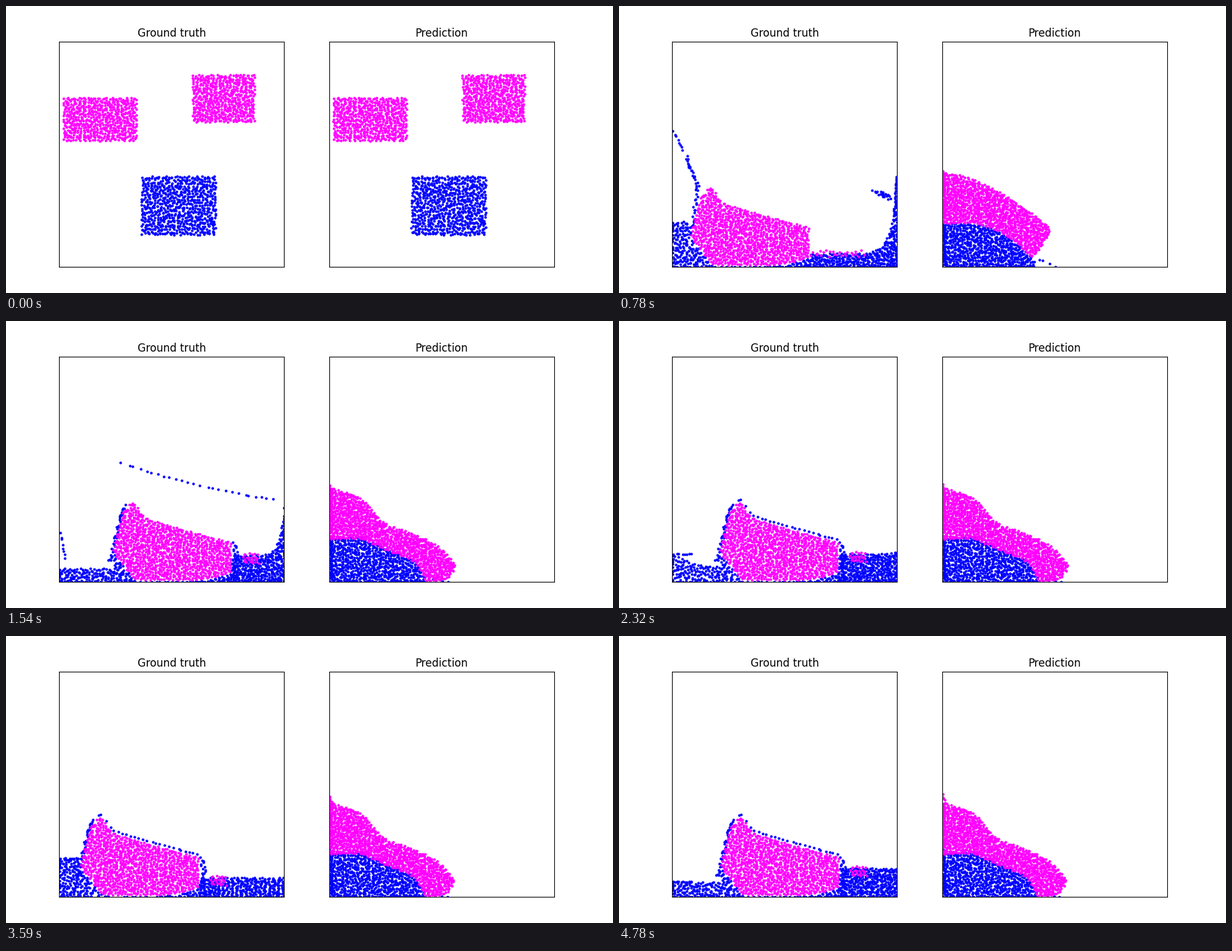
A matplotlib script for the animation above (4.82 s loop, 950 by 450 pixels).

```python
import numpy as np
import matplotlib.pyplot as plt
from matplotlib.animation import FuncAnimation

W, H, DPI = 950, 450, 100
FRAMES, INTERVAL, STEPS = 241, 20, 134
SIDE, LEFT, BASE, GAP = 352.27, 83.0, 41.37, 422.73
FLOOR, GRAVITY = 410, 0.7

GOOP_A, GOOP_B, CHUNK = 575, 515, 25
SPRAY, POOL_L, FLANK, POOL_R, RIM, ROOF = 8, 195, 42, 440, 24, 26
WATER_PARTS = [SPRAY, POOL_L, FLANK, POOL_R, RIM, ROOF]
WATER = sum(WATER_PARTS)
CLING, DRIPS = 32, 5
GOOP_MIX, WATER_MIX = 0.34, 0.55


# ---- spreading particles ----

def fill(n, x0, x1, top, bottom=FLOOR, sizes=None, mix=GOOP_MIX):
    """Spread n particles evenly between two curves, in a stable order."""
    rng = np.random.default_rng(5)
    gx = np.linspace(x0, x1, 500)
    y0, y1 = (f(gx) if callable(f) else np.full(500, float(f)) for f in (top, bottom))
    height = np.maximum(y1 - y0, 0.5)
    cdf = np.concatenate([[0], np.cumsum((height[1:] + height[:-1]) / 2)])
    area = cdf[-1] * (x1 - x0) / 499
    cols = max(1, round((x1 - x0) / np.sqrt(area / n)))
    edges = np.linspace(x0, x1, cols + 1)
    marks = np.round(n * np.interp(edges, gx, cdf / cdf[-1])).astype(int)
    counts = np.diff(marks)

    col = np.repeat(np.arange(cols), counts)
    row = np.arange(n) - marks[col]
    v = (row + 0.3 + 0.4 * (col % 2) + rng.uniform(-mix, mix, n)) / counts[col]
    x = edges[col] + (x1 - x0) / cols * (0.5 + rng.uniform(-0.45, 0.45, n))
    tops = np.interp(x, gx, y0)
    pts = np.column_stack([x, tops + np.clip(v, 0, 1) * np.interp(x, gx, height)])

    # Match poses by narrow strips from left to right, top to bottom inside each.
    order = []
    for part in np.split(np.argsort(x), np.cumsum(sizes or [n])[:-1]):
        k = len(part)
        strip = np.arange(k) * max(1, round(np.sqrt(k))) // k
        order.append(part[np.lexsort((v[part], strip))])
    return pts[np.concatenate(order)]


def strand(n, *path, jitter=1.0):
    """Scatter n particles along a polyline."""
    rng = np.random.default_rng(8)
    path = np.array(path, float)
    u = (np.arange(n) + 0.5 + rng.uniform(-0.4, 0.4, n)) / n * (len(path) - 1)
    pts = [np.interp(u, np.arange(len(path)), c) for c in path.T]
    return np.column_stack(pts) + rng.uniform(-jitter, jitter, (n, 2))


def curve(n, x0, x1, f):
    pts = strand(n, (x0, 0), (x1, 0), jitter=0.8)
    return pts + np.column_stack([np.zeros(n), f(pts[:, 0])])


class Body:
    """Particles that glide through timed poses without overshoot."""

    def __init__(self, poses):
        self.t = np.array(sorted(poses), float)
        self.p = np.array([poses[k] for k in sorted(poses)])
        slope = np.diff(self.p, axis=0) / np.diff(self.t)[:, None, None]
        a, b = slope[:-1], slope[1:]
        same = a * b > 0
        mid = np.where(same, 2 * a * b / np.where(same, a + b, 1), 0)
        self.m = np.concatenate([slope[:1], mid, slope[-1:]])

    def at(self, t):
        i = min(np.searchsorted(self.t, t, side="right") - 1, len(self.t) - 2)
        h = self.t[i + 1] - self.t[i]
        s = (t - self.t[i]) / h
        r = 1 - s
        return ((1 + 2 * s) * r**2 * self.p[i] + s * r**2 * h * self.m[i]
                + s**2 * (3 - 2 * s) * self.p[i + 1] - s**2 * r * h * self.m[i + 1])


# ---- falling blocks, shared by both panels ----

def fall(block, vx, vy, t):
    return block + (vx * t, vy * t + GRAVITY * t**2 / 2)


def falling_goop(a_sizes, b_sizes, dx=0):
    a = fill(GOOP_A, 89 + dx, 204 + dx, 143, 211, a_sizes)
    b = fill(GOOP_B + CHUNK, 291 + dx, 389 + dx, 107, 182, b_sizes)
    return {t: np.vstack([fall(a, -0.25, 6, t), fall(b, -8.75, 3.5, t)])
            for t in (0, 4, 8, 12)}


def falling_water(sizes, mound, dx=0):
    block = fill(WATER, 211 + dx, 328 + dx, 266, 359, sizes, WATER_MIX)
    poses = {t: fall(block, -3, 3.5, t) for t in (0, 4, 8)}
    x0, x1 = mound
    poses[12] = fill(WATER, x0, x1,
                     lambda x: 404 - 72 * np.sin(np.pi * (x - x0) / (x1 - x0)) ** 0.7,
                     sizes=sizes, mix=WATER_MIX)
    return poses


# ---- left panel: a rigid lump sloshing between two pools ----

def drift(step):
    lag = 26 * (max(0, 43 - step) / 21) ** 2
    return -14 + 27 * np.cos(2 * np.pi * (step - 49) / 98) - lag


def lump_top(x, d):
    x = x - d
    ridge = 306 + 0.28 * (x - 195) - 20 * np.exp(-((x - 188) / 12) ** 2)
    return np.maximum(ridge, 355 - 3.6 * (x - 156))


def lump_bottom(x, d):
    x = x - d
    right = 406 - 12 * np.clip((x - 270) / 71, 0, 1) ** 2
    return np.minimum(362 + 1.27 * (x - 156), right)


def left_surface(x, step):
    d = drift(step)
    level = 409 - 1700 / (68 + d)
    swash = 20 * np.exp(-((step - 65) / 12) ** 2)
    q = np.clip((x - 82) / (74 + d), 0, 1)
    return np.where(x < 156 + d, level - swash * (1 - q) ** 2, lump_bottom(x, d) + 2)


def right_surface(x, step):
    d = drift(step)
    level = 409 - 4100 / (93 - d)
    climb = 95 / (1 + np.exp((step - 52) / 4))
    q = np.clip((x - 341 - d) / (95 - d), 0, 1)
    return np.where(x < 341 + d, lump_bottom(x, d) + 2,
                    level + climb / 11 - climb * q**10)


def lump(step):
    d = drift(step)
    return fill(GOOP_A + GOOP_B, 156 + d, 341 + d, lambda x: lump_top(x, d),
                lambda x: lump_bottom(x, d), [GOOP_A, GOOP_B])


def chunk(step, x0, x1, depth):
    top = right_surface((x0 + x1) / 2, step) if depth > 10 else None
    if top is not None:
        return fill(CHUNK, x0, x1, top - 3, top - 3 + depth)
    return fill(CHUNK, x0, x1, lambda x: right_surface(x, step) - 5,
                lambda x: right_surface(x, step) - 5 + depth)


def wet(step, spray=None, flank=None, rim=None, roof=None):
    """Both pools, plus loose drops; drops default to clinging around the lump."""
    d = drift(step)
    level = left_surface(84, step)
    if spray is None:
        spray = strand(SPRAY, (84, level), (115, level))
    if flank is None:
        flank = strand(FLANK, (173 + d, 289), (161 + d, 335), (151 + d, 378), jitter=3)
    if rim is None:
        rim = strand(RIM, (347 + d, 348), (348 + d, 402), jitter=4)
    if roof is None:
        roof = curve(ROOF, 172 + d, 344 + d, lambda x: lump_top(x, d) - 4)
    left = fill(POOL_L, 82, 240 + d, lambda x: left_surface(x, step), mix=WATER_MIX)
    right = fill(POOL_R, 240 + d, 436, lambda x: right_surface(x, step), mix=WATER_MIX)
    return np.vstack([spray, left, flank, right, rim, roof])


goop = falling_goop(None, [GOOP_B, CHUNK])
goop[22] = np.vstack([lump(22), chunk(22, 298, 384, 10)])

water = falling_water(WATER_PARTS, (105, 355))
water[22] = wet(22, strand(SPRAY, (84, 194), (100, 228)),
                strand(FLANK, (104, 236), (122, 280), (114, 350), jitter=2.5),
                strand(RIM, (399, 291), (424, 300), jitter=4),
                strand(ROOF, (430, 330), (434, 266)))
water[30] = wet(30, strand(SPRAY, (84, 162), (88, 240)),
                roof=curve(ROOF, 335, 433, lambda x: 161 + 124 * ((x - 335) / 98) ** 1.3))
water[43] = wet(43, strand(SPRAY, (85, 329), (92, 375)),
                roof=curve(ROOF, 175, 425,
                           lambda x: 221 + 0.33 * (x - 175) - ((x - 175) / 52) ** 2))

for step in (30, 43, 50, 57, 65, 75, 85, 95, 105, 115, 124, 133):
    x = 358 + drift(step)
    goop[step] = np.vstack([lump(step), chunk(step, x, x + 27, 16)])
    if step > 43:
        water[step] = wet(step)


# ---- right panel: a slumped pile over a pond, creeping up the wall ----

REST_GOOP = GOOP_A + GOOP_B + CHUNK - CLING
REST_WATER = WATER - CLING - DRIPS


def pile(x1, top, bottom, peak):
    sizes = [GOOP_A - CLING, GOOP_B + CHUNK]
    return np.vstack([strand(CLING, (508, peak), (510, 340), jitter=1.8),
                      fill(REST_GOOP, 505, x1, top, bottom, sizes, 0.45)])


def pond(x1, top, peak, drip_start, drip_end):
    return np.vstack([strand(CLING, (508, peak), (510, 407), jitter=1.8),
                      fill(REST_WATER, 505, x1, top, mix=WATER_MIX),
                      strand(DRIPS, drip_start, drip_end)])


def fresh_pond(x):
    return 340 + 58 * np.clip((x - 545) / 103, 0, 2) ** 2


def rest_pond(x):
    return 339 + 0.43 * np.maximum(0, x - 555) + 1.3 * np.maximum(0, x - 640)


def rest_top(x):
    s = (x - 505) / 197
    return 260 + 55 * s + 35 / (1 + np.exp((573 - x) / 8)) + 32 * s**8


def rest_bottom(x):
    return np.minimum(rest_pond(x) + 2, 407 - 0.04 * np.maximum(0, x - 680) ** 2)


pred_goop = falling_goop([CLING, GOOP_A - CLING], None, GAP)
pred_goop[22] = pile(673, lambda x: 260 + 86 * ((x - 505) / 168) ** 1.6,
                     lambda x: np.minimum(fresh_pond(x), 393 - 1.4 * (x - 648)), 258)

pred_water = falling_water([CLING, REST_WATER, DRIPS], (525, 728), GAP)
pred_water[22] = pond(650, fresh_pond, 340, (642, 391), (685, 409))

for step, creep in ((43, 0), (133, 1)):
    squeeze = (1 - 0.016 * creep, 1)
    heap = pile(703, rest_top, rest_bottom, 257 - 10 * creep)
    pool = pond(655, rest_pond, 338 - 9 * creep, (652, 402), (694, 410))
    pred_goop[step] = (heap - (506, 0)) * squeeze + (506, 0)
    pred_water[step] = (pool - (506, 0)) * squeeze + (506, 0)


# ---- figure ----

fig = plt.figure(figsize=(W / DPI, H / DPI), dpi=DPI, facecolor="white")


def panel(title, x0, layers):
    ax = fig.add_axes([x0 / W, BASE / H, SIDE / W, SIDE / H])
    ax.set_title(title)
    ax.set_xticks([])
    ax.set_yticks([])
    low = H - BASE - 0.5
    ax.set_xlim(x0 - 0.5, x0 - 0.5 + SIDE)
    ax.set_ylim(low, low - SIDE)
    return [(ax.plot([], [], "o", ms=2, color=color)[0], Body(poses), x0)
            for color, poses in layers]


layers = panel("Ground truth", LEFT, [("blue", water), ("magenta", goop)])
layers += panel("Prediction", LEFT + GAP, [("blue", pred_water), ("magenta", pred_goop)])


def draw(i):
    step = round(i * STEPS / FRAMES)
    for line, body, x0 in layers:
        x, y = body.at(step).T
        line.set_data(np.clip(x, x0 + 0.8, x0 + SIDE - 0.8), np.minimum(y, 408))
    return [line for line, *_ in layers]


anim = FuncAnimation(fig, draw, frames=FRAMES, interval=INTERVAL, repeat=True)
plt.show()
```
